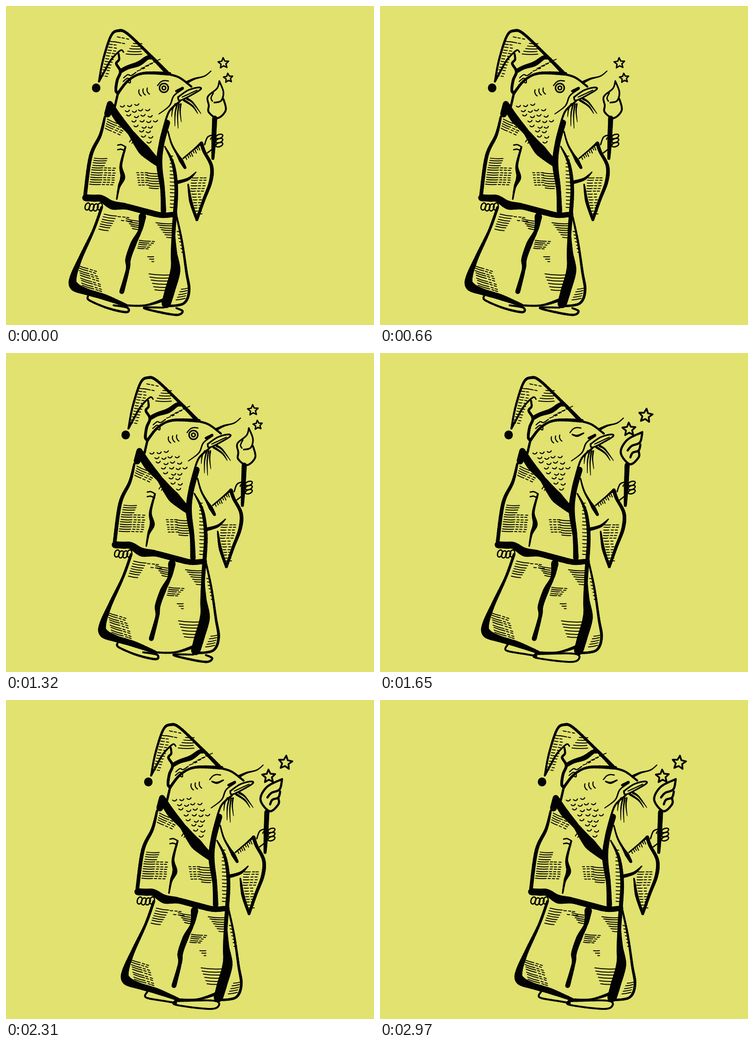
Recreate the animation shown at these times as an HTML page with a canvas. Size 804x697 px, loop 3300 ms.

```html
<!DOCTYPE html>
<html lang="en">
<head>
<meta charset="utf-8">
<title>Walking fish wizard</title>
<style>
html, body { margin: 0; width: 100%; height: 100%; overflow: hidden; background: #e1e26f; }
canvas { display: block; }
</style>
</head>
<body>
<canvas id="stage" width="804" height="697"></canvas>
<script>
const ctx = document.getElementById('stage').getContext('2d');
const PAPER = '#e1e26f', INK = '#030303';
const STEP = 330;
const walkX = [0, 30, 48, 47, 64.5, 84, 101, 114, 131, 157];

let seed = 1;
const jitter = () => (seed = seed * 16807 % 2147483647) / 2147483647 - 0.5;
const mix = (a, b, t) => a + (b - a) * t;

// Smooth curve through "x,y x,y ..." as dense samples.
function spline(text) {
  const p = text.split(' ').map(s => s.split(',').map(Number));
  const last = p.length - 1, out = [];
  const at = i => p[Math.max(0, Math.min(last, i))];
  for (let i = 0; i < last; i++) {
    const a = at(i - 1), b = at(i), c = at(i + 1), d = at(i + 2);
    for (let t = 0; t < 1; t += 0.125) {
      out.push([0, 1].map(j => b[j] + 0.5 * t * (c[j] - a[j] +
        t * (2 * a[j] - 5 * b[j] + 4 * c[j] - d[j] + t * (3 * (b[j] - c[j]) + d[j] - a[j])))));
    }
  }
  return [...out, p[last]];
}

// Brush line; its width runs evenly through the given values.
function brush(text, ...widths) {
  const q = spline(text), last = q.length - 1;
  for (let i = 0; i < last; i++) {
    const s = i / last * (widths.length - 1), k = Math.floor(s);
    ctx.lineWidth = mix(widths[k], widths[k + 1] ?? widths[k], s - k);
    ctx.beginPath();
    ctx.moveTo(...q[i]);
    ctx.lineTo(...q[i + 1]);
    ctx.stroke();
  }
}

function oval(x, y, rx, ry, turn = 0, w = 2.8) {
  ctx.beginPath();
  ctx.ellipse(x, y, rx, ry, turn, 0, 7);
  ctx.lineWidth = w;
  if (w) ctx.stroke(); else ctx.fill();
}

function arc(x, y, r, from, to, w) {
  ctx.beginPath();
  ctx.arc(x, y, r, from, to);
  ctx.lineWidth = w;
  ctx.stroke();
}

function star(x, y, r, w, turn) {
  ctx.beginPath();
  for (let i = 0; i < 10; i++) {
    const a = turn + i * Math.PI / 5, d = i % 2 ? r * 0.47 : r;
    ctx.lineTo(x + d * Math.sin(a), y - d * Math.cos(a));
  }
  ctx.closePath();
  ctx.lineWidth = w;
  ctx.stroke();
}

// n strokes starting between two points, each followed by a few dashes.
function hatch(x0, y0, x1, y1, n, len0, len1, slope = 0, dashes = 0) {
  ctx.lineWidth = 2;
  for (let i = 0; i < n; i++) {
    const t = n > 1 ? i / (n - 1) : 0;
    const len = mix(len0, len1, t) + jitter() * 2;
    const x = mix(x0, x1, t) + jitter(), y = mix(y0, y1, t) + jitter();
    ctx.beginPath();
    ctx.moveTo(x, y);
    ctx.quadraticCurveTo(x + len / 2, y + len * (slope / 2 + 0.06), x + len, y + len * slope);
    for (let k = 0; k < dashes; k++) {
      const s = len + 4 + k * 9 + jitter() * 2;
      ctx.moveTo(x + s, y + s * slope);
      ctx.lineTo(x + s + 5, y + (s + 5) * slope);
    }
    ctx.stroke();
  }
}

function hat() {
  oval(197, 179, 9.3, 9.8, 0, 0);
  brush('203,165 212,118 229,66 245,54 266,61 318,111 352,146', 4, 5, 6, 6, 9);
  brush('203,165 215,143 230,117 250,97 257,101', 4.5, 4, 2.5);
  brush('246,104 247,117 241,126 250,143 243,162 240,184 245,191', 4, 6, 6);
  brush('245,190 268,162 300,147 357,148', 6, 5, 8);
  brush('251,142 266,134 290,126 309,113 317,114', 9, 9, 11, 9, 5);
  hatch(227, 77, 208, 152, 13, 9, 4, .14, 1);
  hatch(243, 67, 236, 78, 2, 6, 6, .2, 2);
  hatch(278, 82, 262, 105, 5, 18, 34, .02);
  for (let i = 0; i < 3; i++) {
    const x = 257 - i, y = 157 + i * 8;
    brush(`${x},${y} ${x + 9},${y - 7} ${x + 16},${y - 5} ${x + 27 - i * 5},${y - 12}`, 2.2);
  }
  hatch(286, 142, 322, 122, 5, 9, 5, -.4, 1);
}

function eye(closed) {
  brush('331,174 338,166 346,163 355,164', 2.3);
  if (closed) {
    brush('336,178 347,181 361,175', 3, 4.6, 2.6);
    return;
  }
  oval(345, 179, 9.6, 9.6, 0, 3.2);
  oval(345, 179, 4, 4, 0, 3);
}

function head(closed) {
  brush('244,193 238,219', 5);
  brush('350,148 378,156 405,176', 4.5);
  brush('387,181 367,196 357,218 334,236', 3, 3, 2);
  brush('380,208 358,228 348,252', 4);
  brush('376,199 398,184 421,178 423,184 382,206 376,199', 3.4);
  brush('385,199 417,184', 2.4);
  brush('372,186 386,179', 5);
  brush('395,167 412,159 434,153 448,142', 6, 3, 2);
  for (let i = 0; i < 2; i++) brush(`${396 - i * 7},${203 + i * 3} 408,${211 + i * 8} ${426 - i * 7},235`, 5, 3.5, 1);
  for (let i = 0; i < 4; i++) {
    const x = 370 + i * 4, endX = 362 + i * 7, endY = 242 + 26 * Math.sin(i * .9);
    brush(`${x},214 ${(x + endX) / 2 - 2},${(214 + endY) / 2 - 3} ${endX},${endY}`, 3.4, 2.6, 1);
  }
  eye(closed);
  for (let i = 0; i < 3; i++) arc(301 + i * 9, 187 - i * 2, 11, 2.1, 3.5, 2.4);
  // Scales fill the space between the lapel and the chin.
  for (let row = 0; row < 8; row++) {
    const y = 214 + row * 11.5;
    const right = Math.min(290 + row * 22, 332 - row);
    for (let x = 253 + row * 8 + row % 2 * 3; x < right; x += 15.5) {
      arc(x + jitter() * 3, y + jitter() * 4, 5, .3, 2.5, 2.3);
    }
  }
}

function farArm() {
  brush('354,274 363,304 383,338', 3, 4, 6);
  brush('372,321 382,337 391,353', 3, 9, 6);
  brush('387,333 406,317 427,299', 3, 3, 6);
  hatch(393, 330, 420, 306, 8, 3, 3, 2.3);
  brush('427,300 433,318 449,350 447,384 432,424 417,467', 8, 7, 8, 7, 6);
  brush('417,467 404,428 398,390', 6, 7, 3);
  brush('371,386 398,378 415,363', 8, 6, 2);
  hatch(406, 375, 404, 405, 6, 13, 11, 0, 2);
  hatch(406, 411, 415, 454, 8, 9, 5, 0, 1);
}

function torch(closed) {
  brush('434,303 441,286 457,281', 2.8);
  brush('440,321 453,311', 2.8);
  for (let i = 0; i < 3; i++) oval(466, 285 + i * 9, 8, 4.4, -.35);
  arc(451, 291, 4, 3, 6, 2.4);
  brush('456,245 454,290 452,333', 11, 10, 6);
  if (closed) {
    brush('489,173 456,190 442,218 462,243 481,228 481,214', 4.6);
    brush('489,173 484,195 466,203 457,213', 4.6);
    brush('485,200 481,213 468,218 463,228', 4.6);
    star(496.5, 137, 15.5, 3.8, .12);
    star(460, 167, 15, 3.8, -.04);
  } else {
    brush('466,164 461,180 441,198 443,217 443,232 462,245 480,228 475,203', 3, 4, 4);
    brush('466,164 475,188 470,207 455,211', 3.4);
    brush('453,190 448,201 451,208', 2.6);
    star(475, 125, 12, 3, -.06);
    star(485.5, 157.5, 10.5, 3, -.1);
  }
}

function coat() {
  brush('216,242 206,282 185,328 173,412', 5, 7, 8, 8);
  brush('227,214 222,236', 13, 15);
  brush('228,218 246,246 271,275 300,313 334,345', 16, 18, 13, 25, 12);
  brush('352,255 340,300 335,345 342,400 344,448', 13, 12, 13, 10, 12);
  brush('347,307 365,345 372,398 369,455', 3, 7, 8, 9);
  hatch(358, 328, 359, 440, 15, 7, 11, .03);
  brush('174,419 192,420 209,421 232,435 262,438 305,449 340,457 369,455', 15, 15, 15, 19, 13, 13, 12, 11);
  for (let y = 304; y < 315; y += 10) brush(`244,${y} 252,${y - 1} 260,${y + 3}`, 2.6);
  brush('261,308 251,348 255,374 247,395 242,422', 4, 6, 11, 5, 3);
  hatch(222, 247, 217, 267, 5, 22, 14, .45, 2);
  hatch(270, 297, 280, 303, 3, 6, 6, -1.5);
  hatch(193, 332, 190, 348, 4, 28, 26, .03);
  hatch(188, 353, 183, 389, 8, 24, 24, .03, 3);
  hatch(286, 364, 290, 391, 6, 4, 4, 0, 2);
  hatch(308, 365, 313, 398, 7, 25, 20, .06);
}

function nearHand() {
  for (let i = 0; i < 4; i++) oval(178 + i * 9, 438 + (i % 3 ? 2 : 0), 5, 8, .35);
}

function skirt() {
  brush('209,440 191,490 163,550 147,592 149,612 175,624 215,636 262,654', 6, 6, 9, 15, 20, 14, 13, 6);
  brush('256,654 305,654 350,640', 4.5, 4.5, 8);
  brush('369,456 366,500 367,540 370,578 358,622 350,650', 9, 8, 14, 22, 22, 20);
  brush('371,452 384,512 394,580 400,622 388,650 350,656', 4, 6, 5);
  brush('298,460 293,490 279,518 267,552 266,575 253,624', 16, 8, 13, 12, 8, 11);
  hatch(214, 455, 203, 487, 7, 28, 20, .16);
  hatch(245, 460, 252, 468, 2, 5, 5, .1, 2);
  hatch(262, 465, 276, 486, 5, 27, 14, .2);
  hatch(328, 473, 351, 505, 7, 37, 12, .06);
  hatch(291, 512, 288, 529, 5, 24, 14, .08, 1);
  hatch(309, 548, 319, 558, 3, 14, 4);
  hatch(158, 567, 168, 616, 10, 20, 26, .32, 2);
  hatch(312, 585, 325, 620, 6, 46, 26, .05);
  hatch(374, 492, 384, 538, 7, 6, 4, .15);
  hatch(383, 619, 372, 642, 5, 14, 20, -.18);
}

function feet(closed) {
  if (closed) {
    brush('195,637 192,650 234,658 258,662', 4);
    brush('256,657 257,666 328,675 350,669 340,657 256,658', 4);
  } else {
    brush('179,634 182,643 222,660 263,669 265,659 235,654', 4, 5, 4);
    brush('345,659 302,659 322,666 372,675 386,667 372,660', 4, 5, 4);
  }
}

function draw(step) {
  const closed = step % 2 === 1;
  seed = 7;
  ctx.setTransform(1, 0, 0, 1, 0, 0);
  ctx.fillStyle = PAPER;
  ctx.fillRect(0, 0, 804, 697);
  ctx.translate(walkX[step], closed && step < 4 ? 8 : 0);
  ctx.fillStyle = ctx.strokeStyle = INK;
  ctx.lineCap = ctx.lineJoin = 'round';
  feet(closed);
  skirt();
  nearHand();
  head(closed);
  hat();
  farArm();
  torch(closed);
  coat();
}

const start = performance.now();
let shown = -1;
function tick() {
  const step = Math.floor((performance.now() - start) / STEP) % walkX.length;
  if (step !== shown) draw(shown = step);
  requestAnimationFrame(tick);
}
tick();
</script>
</body>
</html>
```
